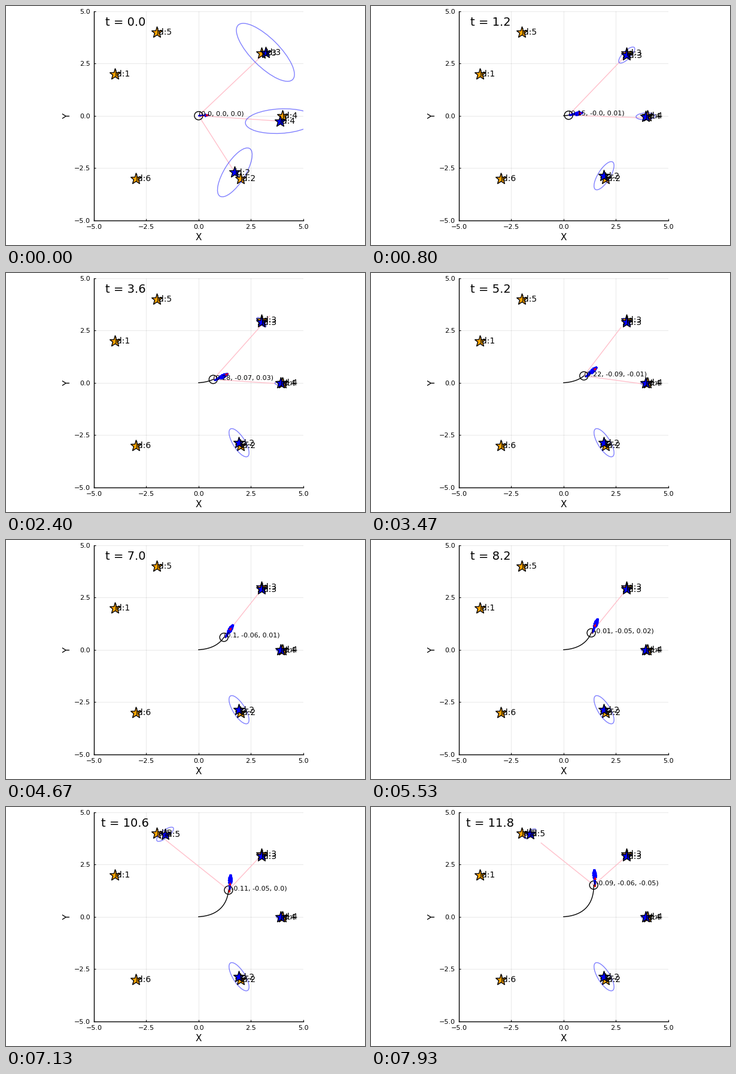
Write a matplotlib script that moves like this. It is 600 px wide and 400 px high and loops after 8000 ms.

```python
import numpy as np
import matplotlib.pyplot as plt
from matplotlib.animation import FuncAnimation
from matplotlib.collections import LineCollection, PolyCollection
from matplotlib.patches import Circle, Ellipse

plt.rcParams["font.family"] = "DejaVu Sans"

FRAMES, LOOP_MS, DT = 120, 8000, 0.1
PX = 1 / 35                      # one pixel in data units
SPEED, ARROW = 0.2, 0.5
FOV = np.radians(60.85)
rng = np.random.default_rng(4)
time = np.arange(FRAMES) * DT

# robot path: constant speed, a left turn with a slow weave
heading = 0.05 + 0.13 * time - 0.08 * np.sin(2 * np.pi * time / 12)
step = SPEED * DT * np.stack([np.cos(heading), np.sin(heading)], axis=1)
path = np.vstack([[0, 0], np.cumsum(step, axis=0)[:-1]])

# pose error in the robot frame: forward, left, angle
KEYS = [0, 1.2, 3.6, 5.2, 7.0, 9.6, 11.9]
err_x = np.interp(time, KEYS, [0, 0.15, 0.28, 0.22, 0.10, -0.13, -0.09])
err_y = np.interp(time, KEYS, [0, -0.001, -0.07, -0.09, -0.06, -0.04, -0.06])
err_a = np.interp(time, KEYS, [0, 0.01, 0.03, -0.01, 0.01, 0.04, -0.05])

# particles spread out once and keep their place in the cloud
COUNT = 40
spread = 1 - np.exp(-1.2 * time)
ahead = rng.uniform(-0.02, 0.27, COUNT)
side = rng.normal(0, 0.025, COUNT)
turn = rng.normal(0, 0.05, COUNT)

LANDMARKS = {1: (-4, 2), 2: (2, -3), 3: (3, 3), 4: (4, 0), 5: (-2, 4), 6: (-3, -3)}


class Estimate:
    """Mapped landmark: each sighting shrinks its ellipse and its offset."""

    def __init__(self, num, axes, tilt, first, settled, hops=()):
        self.num, self.axes, self.tilt, self.hops = num, np.array(axes) * PX, tilt, hops
        true = np.array(LANDMARKS[num])
        ray = true - path
        off = np.arctan2(ray[:, 1], ray[:, 0]) - heading
        self.seen = np.abs((off + np.pi) % (2 * np.pi) - np.pi) < FOV
        self.hits = np.cumsum(self.seen)
        self.share = 1 / np.maximum(self.hits, 1)[:, None]
        first, settled = np.array(first), np.array(settled)
        self.pos = true + settled + (first - settled) * self.share
        # noisy range and bearing of each sighting
        noise = (1 - self.share) * rng.normal(0, [0.08, 0.02], (FRAMES, 2))
        across = ray[:, ::-1] * [-1, 1]
        self.ends = self.pos + ray * noise[:, :1] + across * noise[:, 1:]

    def at(self, i):
        a, b = self.axes * np.sqrt(self.share[i])
        flips = sum(time[i] >= hop for hop in self.hops)
        return self.pos[i], a, b, self.tilt * (-1) ** flips


estimates = [
    Estimate(2, (47, 17.5), 58, (-0.27, 0.29), (0.03, 0.05), hops=(2.1,)),
    Estimate(3, (64.4, 23.7), -45, (0.19, 0.03), (0, -0.11), hops=(0.4, 2.1)),
    Estimate(4, (58, 20.5), 3, (-0.11, -0.26), (-0.08, -0.01)),
    Estimate(5, (57.8, 20.6), 38.6, (0.39, -0.63), (0.4, 0)),
]

fig = plt.figure(figsize=(6, 4), dpi=100, facecolor="white")
ax = fig.add_axes([146.9 / 600, 41.4 / 400, 350 / 600, 350 / 400])
ax.set(xlim=(-5, 5), ylim=(-5, 5))
marks = np.arange(-5, 5.1, 2.5)
ax.set_xticks(marks)
ax.set_yticks(marks)
ax.tick_params(direction="in", length=2.4, width=0.8, pad=4.5, labelsize=8)
ax.set_axisbelow(True)
ax.grid(color="black", alpha=0.1, linewidth=0.6)
for name, spine in ax.spines.items():
    spine.set_visible(name in ("left", "bottom"))
    spine.set_linewidth(1)
fig.text(322 / 600, 12 / 400, "X", size=11, ha="center", va="center")
fig.text(102.5 / 600, 216 / 400, "Y", size=11, ha="center", va="center", rotation=90)


def drop(size):
    """Distance from the anchor down to the text baseline."""
    return (0.365 * size * 100 / 72 - 0.6) * PX


def label(x, y, text, size, ha="left"):
    return ax.text(x, y - drop(size), text, size=size, ha=ha, va="baseline", zorder=20)


def star(x, y, color, z):
    return ax.plot([x], [y], "*", ms=14.2, mfc=color, mec="black", mew=1, zorder=z)[0]


def arrow(x, y, a, head=7, half=2.8):
    """Shaft and head of an arrow starting at (x, y)."""
    ux, uy = np.cos(a), np.sin(a)
    tx, ty = x + ARROW * ux, y + ARROW * uy
    bx, by = tx - head * PX * ux, ty - head * PX * uy
    w = half * PX
    return [(x, y), (tx, ty)], [(tx, ty), (bx - w * uy, by + w * ux), (bx + w * uy, by - w * ux)]


def lines(color, width, z):
    return ax.add_collection(LineCollection([], colors=color, linewidths=width, zorder=z))


def triangles(color, z):
    return ax.add_collection(PolyCollection([], facecolors=color, edgecolors="none", zorder=z))


for num, (lx, ly) in LANDMARKS.items():
    star(lx, ly, "orange", 5)
    label(lx, ly, f"id:{num}", 10)

views = []
for est in estimates:
    ray, = ax.plot([], [], color="pink", lw=1, zorder=4)
    oval = ax.add_patch(Ellipse((0, 0), 1, 1, fill=False, ec="blue", alpha=0.5, lw=1, zorder=7))
    views.append((est, ray, oval, star(0, 0, "blue", 8), label(0, 0, f"id:{est.num}", 10)))

trail, = ax.plot([], [], color="black", lw=1, zorder=9)
body = ax.add_patch(Circle((0, 0), 0.2, fill=False, ec="black", lw=1, zorder=9))
red_shaft = lines("red", 2, 10)
shafts = lines("blue", 0.9, 11)
heads = triangles("blue", 12)
red_head = triangles("red", 13)
clock = label(-3.5, 4.5, "", 14, "center")
error = label(0, 0, "", 8)


def shifted(i, forward, left):
    """Point offset from the robot along its own axes."""
    c, s = np.cos(heading[i]), np.sin(heading[i])
    return path[i, 0] + forward * c - left * s, path[i, 1] + forward * s + left * c


def update(i):
    x, y = path[i]
    clock.set_text(f"t = {time[i]:.1f}")
    trail.set_data(path[:i + 1, 0], path[:i + 1, 1])
    body.center = (x, y)

    for est, ray, oval, mark, tag in views:
        for part in (oval, mark, tag):
            part.set_visible(est.hits[i] > 0)
        ray.set_visible(est.seen[i])
        ray.set_data([x, est.ends[i, 0]], [y, est.ends[i, 1]])
        (ex, ey), a, b, angle = est.at(i)
        oval.set(center=(ex, ey), width=2 * a, height=2 * b, angle=angle)
        mark.set_data([ex], [ey])
        tag.set_position((ex, ey - drop(10)))

    grow = spread[i]
    parts = [arrow(*shifted(i, grow * f, err_y[i] + grow * s), heading[i] + grow * r)
             for f, s, r in zip(ahead, side, turn)]
    shafts.set_segments([p[0] for p in parts])
    heads.set_verts([p[1] for p in parts])
    line, tip = arrow(*shifted(i, err_x[i], err_y[i]), heading[i] + err_a[i], 5.5, 2.2)
    red_shaft.set_segments([line])
    red_head.set_verts([tip])

    values = ", ".join(str(round(float(e[i]), 2)) for e in (err_x, err_y, err_a))
    error.set_text(f"({values})")
    error.set_position((x, y + 0.1 - drop(8)))
    return []


anim = FuncAnimation(fig, update, frames=FRAMES, init_func=lambda: update(0),
                     interval=LOOP_MS / FRAMES, repeat=True, repeat_delay=0, blit=False)
plt.show()
```
